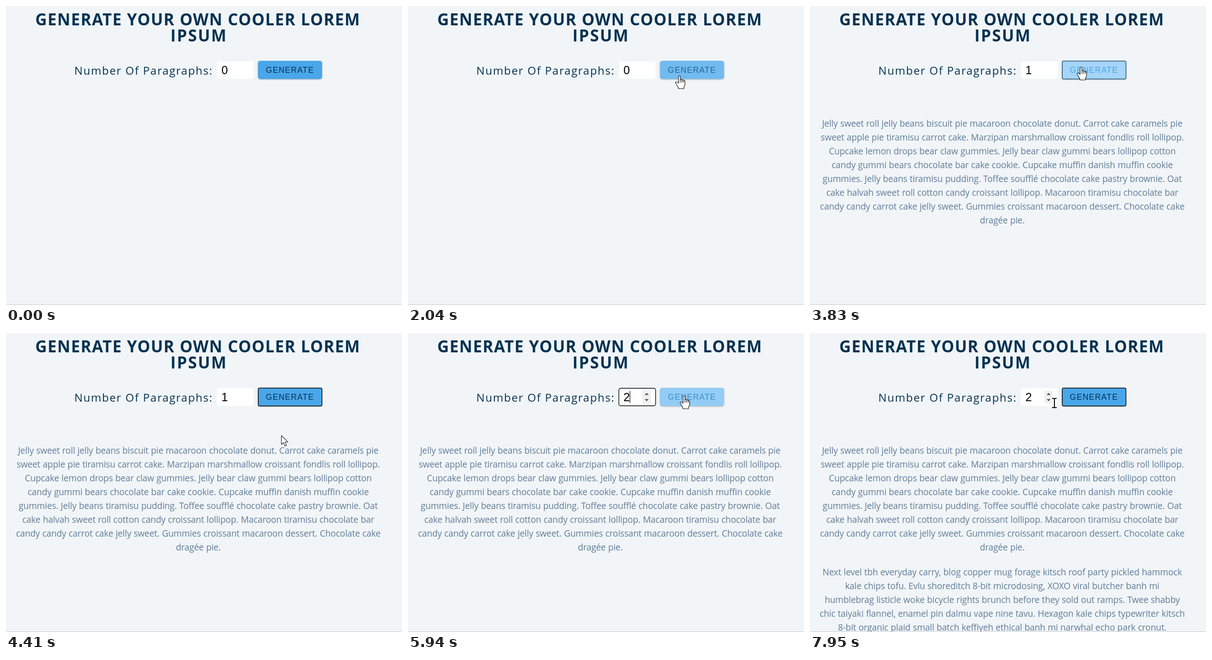
Recreate the animation shown at these times as an HTML page. Size 862 by 649 pixels, loop 8000 ms.

```html
<!DOCTYPE html>
<html lang="en">
<head>
<meta charset="utf-8">
<title>Lorem generator</title>
<style>
  html, body { margin: 0; width: 100%; height: 100%; overflow: hidden; background: #f1f5f8; }
  svg { display: block; width: 862px; height: 649px; }
  text { white-space: pre; }
  .title, .label, .copy { font-family: "Open Sans", "Noto Sans", sans-serif; fill: #063251; }
  .title { font-size: 35px; font-weight: 700; }
  .label { font-size: 24px; letter-spacing: 1.7px; }
  .copy { font-size: 19.2px; letter-spacing: -.2px; word-spacing: .5px; text-anchor: middle; fill: #617d98; }
  .field, .button { font-family: "Liberation Sans", Arial, sans-serif; }
  .field { font-size: 25px; }
  .button { font-size: 17.5px; letter-spacing: 1.25px; }
  #face { filter: drop-shadow(0 1px 1.5px rgba(0, 0, 0, .3)); }
  .ring { fill: none; stroke: #000; stroke-width: 1.4; }
</style>
</head>
<body>
<svg viewBox="0 0 862 649">
  <rect width="862" height="649" fill="#f1f5f8"/>
  <text class="title" x="63.7" y="42" letter-spacing="1.43">GENERATE YOUR OWN COOLER LOREM</text>
  <text class="title" x="358" y="77" letter-spacing="2.3">IPSUM</text>
  <text class="label" x="148.8" y="149">Number Of Paragraphs:</text>

  <rect x="459" y="120" width="80" height="38" rx="5" fill="#fff"/>
  <text id="count" class="field" x="469" y="148">0</text>
  <rect id="caret" x="482.5" y="126" width="1.2" height="26"/>
  <g id="spinner">
    <rect id="up" x="510" y="125" width="18.5" height="14"/>
    <rect id="down" x="510" y="139" width="18.5" height="14"/>
    <path d="M515 134.5l4.5-4.5 4.5 4.5zM515 143.5l4.5 4.5 4.5-4.5z" fill="#505050"/>
  </g>
  <rect id="fieldRing" class="ring" x="459" y="120" width="80" height="38" rx="4"/>

  <rect id="face" x="548.5" y="119" width="139.5" height="39.5" rx="5"/>
  <rect id="buttonRing" class="ring" x="549.3" y="119.5" width="138.4" height="39" rx="2.5"/>
  <text id="caption" class="button" x="565.6" y="144.5">GENERATE</text>

  <g id="first" class="copy"></g>
  <g id="second" class="copy"></g>
  <rect y="648" width="862" height="1" fill="#c6c9cc"/>

  <g id="cursor" stroke-linejoin="round">
    <path id="arrow" fill="#fff" stroke="#111" stroke-width="1.1"
      d="M.5.5V20L5 15.8 8.3 23.4 11.5 22 8.3 14.7H14.6Z"/>
    <g id="hand" fill="#fff" stroke="#111" stroke-width="1.2">
      <path d="M-2 16.5V2.4Q-2 .5 0 .5T2 2.4V8.6Q4.5 7 5.5 9.6Q8 8 9 10.6Q11.5 9.5 12 12.5V19Q12 22 9.5 25V28.5H-2.5V26Q-5 23-6 20L-8.5 16Q-9 13.5-7 13.5T-2 16.5Z"/>
      <path fill="none" d="M2 8.6V15M5.5 9.6V15M9 10.6V15"/>
    </g>
    <path id="beam" fill="none" stroke="#000" stroke-width="2"
      d="M-5-10H-2Q0-10 0-8V8Q0 10-2 10H-5M5-10H2Q0-10 0-8M5 10H2Q0 10 0 8"/>
  </g>
</svg>
<script>
const LOOP = 8000, ENTER = 170, TICK = 110, FADE = 300, TRAVEL = 600, RELEASE = 150;
const $ = id => document.getElementById(id);
const show = (id, on) => $(id).setAttribute('visibility', on ? 'visible' : 'hidden');
const clamp = v => Math.max(0, Math.min(1, v));
const mix = (a, b, k) => `rgb(${a.map((v, i) => Math.round(v + (b[i] - v) * k))})`;

const NAVY = [6, 50, 81], BLUE = [73, 166, 233], PALE = [165, 213, 248], BLACK = [0, 0, 0];

const paragraphs = {
  first: [262, [
    'Jelly sweet roll jelly beans biscuit pie macaroon chocolate donut. Carrot cake caramels pie',
    'sweet apple pie tiramisu carrot cake. Marzipan marshmallow croissant fondlis roll lollipop.',
    'Cupcake lemon drops bear claw gummies. Jelly bear claw gummi bears lollipop cotton',
    'candy gummi bears chocolate bar cake cookie. Cupcake muffin danish muffin cookie',
    'gummies. Jelly beans tiramisu pudding. Toffee soufflé chocolate cake pastry brownie. Oat',
    'cake halvah sweet roll cotton candy croissant lollipop. Macaroon tiramisu chocolate bar',
    'candy candy carrot cake jelly sweet. Gummies croissant macaroon dessert. Chocolate cake',
    'dragée pie.']],
  second: [526, [
    'Next level tbh everyday carry, blog copper mug forage kitsch roof party pickled hammock',
    'kale chips tofu. Evlu shoreditch 8-bit microdosing, XOXO viral butcher banh mi',
    'humblebrag listicle woke bicycle rights brunch before they sold out ramps. Twee shabby',
    'chic taiyaki flannel, enamel pin dalmu vape nine tavu. Hexagon kale chips typewriter kitsch',
    '8-bit organic plaid small batch keffiyeh ethical banh mi narwhal echo park cronut.']]
};
for (const [id, [top, lines]] of Object.entries(paragraphs)) {
  $(id).innerHTML = lines.map((line, i) =>
    `<text x="418.5" y="${top + Math.round(29.93 * i)}">${line}</text>`).join('');
}

// Pointer stops by arrival time
const stops = [
  { at: ENTER, x: 691, y: 413 },
  { at: 720, x: 681, y: 449 },
  { at: 1500, x: 597, y: 274 },
  { at: 2040, x: 591, y: 151 },
  { at: 2450, x: 520, y: 147 },
  { at: 2810, x: 511, y: 138 },
  { at: 3000, x: 520, y: 128 },
  { at: 3750, x: 590, y: 132 },
  { at: 4500, x: 600, y: 228 },
  { at: 4780, x: 560, y: 175 },
  { at: 5340, x: 521, y: 129 },
  { at: 6160, x: 621, y: 138 },
  { at: 7160, x: 641, y: 279 },
  { at: 7610, x: 641, y: 279 },
  { at: 7870, x: 532, y: 152 }
];

// Presses alternate between the spinner and the button
const presses = [3070, 3650, 5450, 6250];
const pressesBy = t => presses.filter(p => p <= t).length;

const inBox = ({ x, y }, left, top, right, bottom) => x >= left && x < right && y >= top && y < bottom;
const inField = p => inBox(p, 459, 120, 539, 158);
const onSpinner = p => inBox(p, 510, 120, 529, 158);
const onButton = p => inBox(p, 548, 119, 688, 159);

function pointerAt(t) {
  const i = stops.findIndex(s => s.at > t);
  if (i < 1) return stops[i ? stops.length - 1 : 0];
  const from = stops[i - 1], to = stops[i];
  const start = Math.max(from.at, to.at - TRAVEL);
  const ease = 1 - (1 - clamp((t - start) / (to.at - start))) ** 2;
  return { x: from.x + (to.x - from.x) * ease, y: from.y + (to.y - from.y) * ease };
}

// Follows the linear hover fade through the recent past
function hoverAt(t) {
  const step = 15;
  let level = 0;
  for (let s = t - 3 * FADE; s < t; s += step) {
    level = clamp(level + (onButton(pointerAt(s)) ? step : -step) / FADE);
  }
  return level;
}

function drawField(t, pointer, focused, since) {
  const spinning = onSpinner(pointer);
  const shade = over => spinning && over ? '#cbcbcb' : '#f0f0f0';
  $('count').textContent = Math.ceil(pressesBy(t) / 2);
  show('fieldRing', focused);
  show('caret', focused && since % 1000 < 500);
  show('spinner', focused || inField(pointer));
  $('up').setAttribute('fill', shade(pointer.y < 138));
  $('down').setAttribute('fill', shade(pointer.y >= 138));
}

function drawButton(hover, focused, since) {
  $('face').setAttribute('fill', mix(BLUE, PALE, hover));
  $('caption').setAttribute('fill', mix(NAVY, BLUE, hover));
  show('buttonRing', focused);
  $('buttonRing').style.stroke = mix(BLUE, BLACK, clamp(since / FADE));
}

function drawCursor(t, pointer) {
  const shape = onButton(pointer) ? 'hand' : inField(pointer) && !onSpinner(pointer) ? 'beam' : 'arrow';
  $('cursor').setAttribute('transform', `translate(${Math.round(pointer.x)} ${Math.round(pointer.y)})`);
  for (const id of ['hand', 'beam', 'arrow']) show(id, t >= ENTER && id === shape);
}

function draw(t) {
  const tick = ENTER + Math.floor((t - ENTER) / TICK) * TICK;
  const pointer = pointerAt(tick);
  const count = pressesBy(t);
  const since = count ? tick - presses[count - 1] : 0;
  const made = Math.floor(pressesBy(t - RELEASE) / 2);

  drawField(t, pointer, count % 2 === 1, Math.max(0, since));
  drawButton(hoverAt(tick), count > 0 && count % 2 === 0, since);
  show('first', made >= 1);
  show('second', made >= 2);
  drawCursor(t, pointer);
}

const begin = performance.now();
function frame() {
  draw((performance.now() - begin) % LOOP);
  requestAnimationFrame(frame);
}
frame();
</script>
</body>
</html>
```
